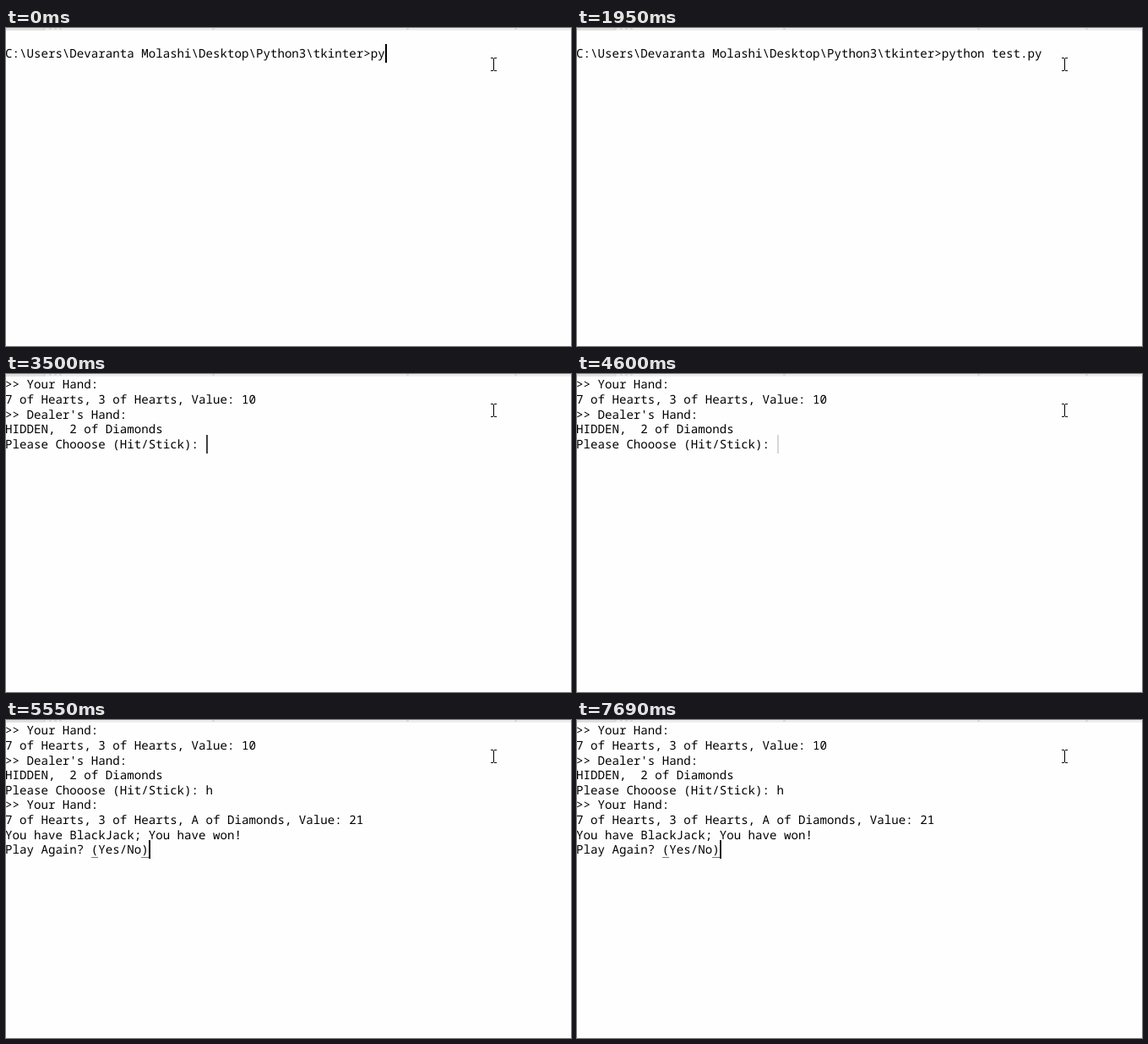
An HTML page for the animation above (8000 ms loop, 669 px wide and 376 px high).

```html
<!DOCTYPE html>
<html lang="en">
<head>
<meta charset="utf-8">
<style>
html, body { margin: 0; width: 100%; height: 100%; overflow: hidden; background: #fefefe; }
body { position: relative; }
svg, pre, i { position: absolute; left: 0; top: 0; }
pre {
  left: -1px; top: 4.2px; margin: 0; color: #000;
  font: 14.15px/17.65px "Noto Sans Mono", monospace;
  text-rendering: geometricPrecision;
}
u { text-decoration: none; box-shadow: inset 0 -1px #777; }
#caret { width: 2px; height: 22px; background: #000; }
</style>
</head>
<body>
<svg width="669" height="376" shape-rendering="crispEdges">
  <path fill="#ededed" d="M0 0H669V3H0z"/>
  <path fill="#e0e0e0" d="M0 0H46V3H0z"/>
  <path stroke="#dadada" stroke-width="2" d="M44 1h3m4 0h3m3 0h3m3 0h3M244 1h3M474 1h3M602 1h3"/>
  <path fill="#000" d="M574 35h3v1h-3zM578 35h3v1h-3zM577 36h1v14h-1zM574 50h3v1h-3zM578 50h3v1h-3z"/>
</svg>
<pre id="screen"></pre>
<i id="caret"></i>
<script>
const LOOP = 8000, COL = 8.47, ROW = 17.6;
const BLINK = 1030, FADE = 120;

const prompt = "\nC:\\Users\\Devaranta Molashi\\Desktop\\Python3\\tkinter>";
const command = "python test.py\n";
const typed = count => prompt + command.slice(0, count);
const deal = `>> Your Hand:
7 of Hearts, 3 of Hearts, Value: 10
>> Dealer's Hand:
HIDDEN,  2 of Diamonds
Please Chooose (Hit/Stick): `;
const result = deal + `h
>> Your Hand:
7 of Hearts, 3 of Hearts, A of Diamonds, Value: 21
You have BlackJack; You have won!
Play Again? (Yes/No)`;

// Each key press or output: time and the screen it leaves
const events = [
  [0, typed(2)], [130, typed(4)], [210, typed(5)], [350, typed(6)],
  [530, typed(7)], [1100, typed(8)], [1260, typed(9)], [1560, typed(14)],
  [1950, typed(15)], [1990, ""], [2040, deal], [5280, deal + "h"], [5550, result]
];

const screen = document.getElementById("screen");
const caret = document.getElementById("caret");
let shown;

// Solid after each event, then a soft blink
function caretOpacity(age) {
  const phase = Math.max(age - 250, 0) % BLINK;
  const distance = Math.min(phase, BLINK - phase);
  return Math.min(1, Math.max(0, (270 - distance) / FADE));
}

function show(text) {
  const lines = text.split("\n");
  const column = lines.at(-1).length;
  screen.textContent = text;
  // The editor underlines the bracket pair beside the caret
  if (text.endsWith(")")) {
    screen.innerHTML = screen.innerHTML.replace(/\(([^()]*)\)$/, "<u>(</u>$1<u>)</u>");
  }
  caret.hidden = column === 0;
  caret.style.left = Math.floor(column * COL + 0.2) + "px";
  caret.style.top = Math.round((lines.length - 1) * ROW + 1.5) + "px";
  shown = text;
}

function draw() {
  const t = performance.now() % LOOP;
  const [start, text] = events.findLast(([time]) => time <= t);
  if (text !== shown) show(text);
  caret.style.opacity = caretOpacity(t - start);
  requestAnimationFrame(draw);
}
draw();
</script>
</body>
</html>
```
